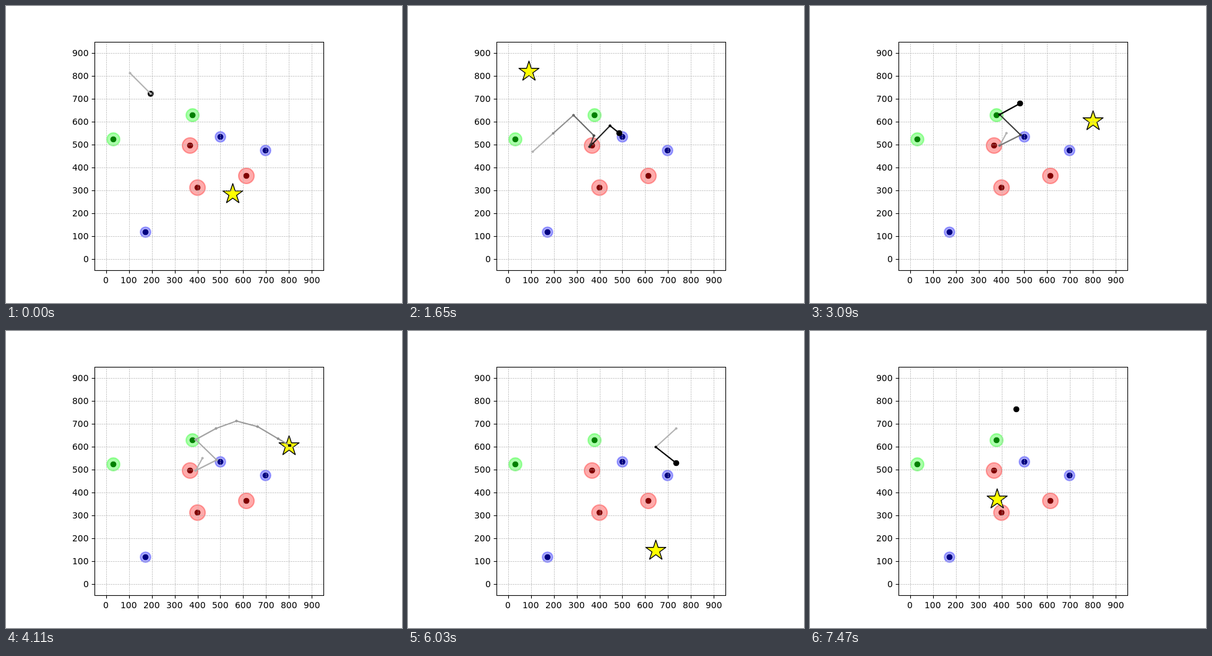
Animation, 640 px wide and 480 px high, one loop 7500 ms. Source, as an HTML page with a canvas:

```html
<!DOCTYPE html>
<html>
<head>
<meta charset="utf-8">
<style>
  html, body { margin: 0; width: 100%; height: 100%; overflow: hidden; background: #fff; }
  canvas { display: block; }
</style>
</head>
<body>
<canvas id="stage" width="640" height="480"></canvas>
<script>
const ctx = document.getElementById('stage').getContext('2d');
const FRAME = 30, RUN_STEPS = 50, FRAMES = 250;
const PT = 100 / 72;
const UNIT = 0.3696; // pixels per axis unit
const STRIDE = 90 * UNIT;

const kinds = [
  { zone: '#f00', core: '#800000', r: 9 * PT, at: [[297, 225], [309, 293], [388, 274]] },
  { zone: '#0f0', core: '#008000', r: 7.5 * PT, at: [[173, 215], [301, 176]] },
  { zone: '#00f', core: '#000080', r: 6 * PT, at: [[346, 211], [419, 233], [225, 365]] },
];

// Stops that most runs share, one at each kind of place, and the turn above them
const RED = [306, 225], BLUE = [340, 208], GREEN = [306, 175], TURN = [339, 142];
const EAST = [[372, 141], [471, 237]];

const runs = [
  { goal: [366, 303.5], via: [[200, 108], [266, 174], RED, BLUE, GREEN, TURN, ...EAST] },
  { goal: [195, 105.5], via: [[201, 235], [267, 176], [300, 209], [293, 227], [326, 193], [341, 205], [240, 108]] },
  { goal: [457, 185.5], via: [[317, 205], RED, BLUE, GREEN, [339, 157], [372, 145], [406, 154]] },
  { goal: [196, 121.5], via: [[315, 126], [343, 160], [305, 218], [340, 206], [240, 108], [206, 113]] },
  { goal: [400, 354.5], via: [[433, 157], [400, 187], [433, 213], [400, 233], [367, 200], BLUE, [313, 176],
    TURN, GREEN, BLUE, RED, BLUE, GREEN, TURN, ...EAST, [494, 270], [494, 303]] },
  { goal: [302, 271.5], via: [[333, 126]] },
];

// Walk from stop to stop, at most one stride per step along either axis
function walk({ goal: [gx, gy], via }) {
  let [x, y] = via[0];
  const path = [[x, y]];
  for (const [tx, ty] of [...via.slice(1), [gx + 1, gy - 1]]) {
    while (x !== tx || y !== ty) {
      const dx = tx - x, dy = ty - y;
      const far = Math.max(Math.abs(dx), Math.abs(dy));
      const part = far < STRIDE + 1.5 ? 1 : STRIDE / far;
      [x, y] = part === 1 ? [tx, ty] : [x + dx * part, y + dy * part];
      path.push([x, y]);
    }
  }
  return path;
}
for (const run of runs) run.path = walk(run);

function line(x1, y1, x2, y2) {
  ctx.beginPath();
  ctx.moveTo(x1, y1);
  ctx.lineTo(x2, y2);
  ctx.stroke();
}

function pen(color, points) {
  ctx.strokeStyle = color;
  ctx.lineWidth = points * PT;
}

function disc(x, y, r, color) {
  ctx.fillStyle = color;
  ctx.beginPath();
  ctx.arc(x, y, r, 0, 7);
  ctx.fill();
}

function place([x, y], { zone, core, r }) {
  ctx.globalAlpha = 0.33;
  disc(x, y, r, zone);
  pen(zone, 1.5);
  ctx.stroke();
  ctx.globalAlpha = 1;
  disc(x, y, 3.5 * PT, core);
}

function star(x, y) {
  const R = 12.3 * PT;
  ctx.beginPath();
  for (let i = 0; i < 10; i++) {
    const a = i * Math.PI / 5, r = i % 2 ? R * 0.382 : R;
    ctx.lineTo(x + r * Math.sin(a), y - r * Math.cos(a));
  }
  ctx.closePath();
  ctx.fillStyle = '#ff0';
  ctx.fill();
  pen('#000', 1);
  ctx.lineJoin = 'round';
  ctx.stroke();
}

function axes() {
  const tick = 3.5 * PT;
  ctx.font = 10 * PT + 'px "DejaVu Sans", sans-serif';
  for (let v = 0; v < 1000; v += 100) {
    const px = 161.68 + v * UNIT, py = 408.72 - v * UNIT;
    const x = Math.round(px), y = Math.round(py);
    pen('#b0b0b0', 0.5);
    ctx.setLineDash([1.85 * PT, 0.8 * PT]);
    line(x, 427, x, 58);
    line(143, y, 513, y);
    ctx.setLineDash([]);
    pen('#000', 0.8);
    line(x, 427, x, 427 + tick);
    line(143, y, 143 - tick, y);
    const w = ctx.measureText(v).width;
    ctx.fillStyle = '#000';
    ctx.fillText(v, Math.round(px - w / 2) - 0.5, 447.5);
    ctx.fillText(v, Math.round(133.48 - w) - 0.5, y + 4.5);
  }
}

function trail(at, steps) {
  ctx.lineCap = 'square';
  for (let i = 0; i < steps; i++) {
    const v = 178.5 * (1 - i / Math.max(1, steps - 1));
    const color = `rgb(${v},${v},${v})`;
    const a = at(i), b = at(i + 1);
    pen(color, 1.5);
    if (a !== b) line(...a, ...b);
    disc(...a, 1.5 * PT, color);
    disc(...b, 1.5 * PT, color);
  }
  ctx.lineCap = 'butt';
}

function draw(now) {
  const count = Math.floor(now / FRAME) % FRAMES + 1;
  const { goal, path } = runs[Math.floor(count / RUN_STEPS)];
  const steps = count % RUN_STEPS;
  const at = i => path[Math.min(i, path.length - 1)];

  ctx.setTransform(1, 0, 0, 1, 0, 0);
  ctx.fillStyle = '#fff';
  ctx.fillRect(0, 0, 640, 480);
  ctx.translate(0.5, 0.5); // pixel centres
  for (const kind of kinds) kind.at.forEach(p => place(p, kind));
  disc(...at(steps), 3.5 * PT, '#000');
  star(...goal);
  axes();
  trail(at, steps);
  pen('#000', 0.8);
  ctx.lineJoin = 'miter';
  ctx.strokeRect(143, 58, 370, 369);
}

const start = performance.now();
function loop() {
  draw(performance.now() - start);
  requestAnimationFrame(loop);
}
loop();
</script>
</body>
</html>
```
